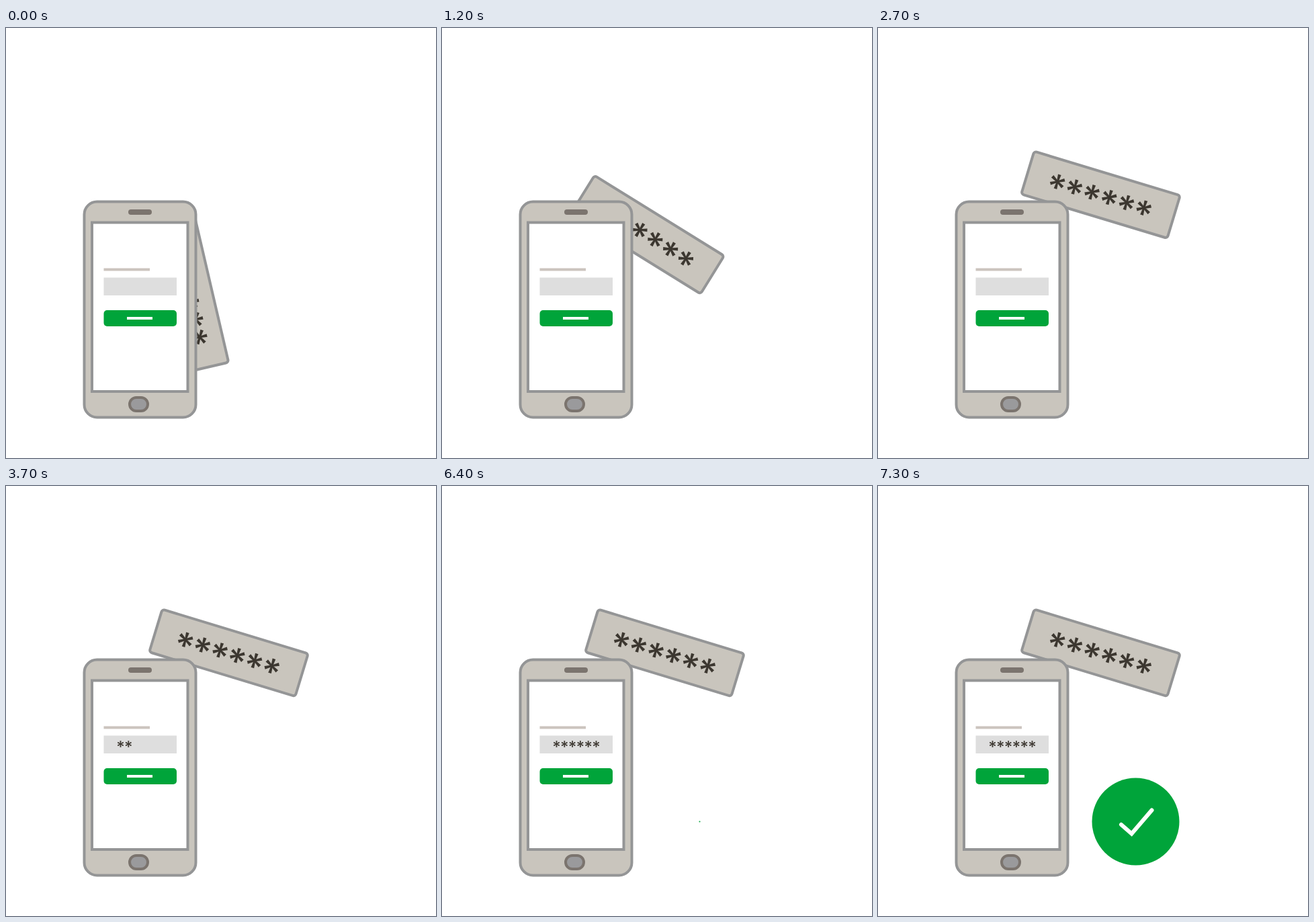
Animation of 640x640 px, one loop 9.2 s. Source, as an HTML page:

```html
<!DOCTYPE html>
<html lang="en">
<head>
<meta charset="utf-8">
<title>Entering a code</title>
<style>
html, body { margin: 0; width: 100%; height: 100%; overflow: hidden; background: #fff; }
svg { display: block; width: 100vw; height: 100vh; }
.body { fill: #c9c5bd; stroke: #949596; stroke-width: 4; }
.star { fill: #3c3730; }
.green { fill: #00a43a; }
</style>
</head>
<body>
<svg viewBox="0 0 640 640">
  <defs>
    <path id="arm" d="M-1.3 0L-2.4 -11H2.4L1.3 0Z"/>
    <g id="star"></g>
  </defs>
  <g id="card">
    <rect class="body" x="-113.5" y="-33.25" width="227" height="66.5" rx="4"/>
    <g id="code" class="star"></g>
  </g>
  <rect class="body" x="116.5" y="258.5" width="166" height="321" rx="19"/>
  <rect x="182" y="270" width="35" height="8" rx="4" fill="#7b746e"/>
  <rect x="128" y="289.5" width="142.5" height="251.5" fill="#fff" stroke="#949596" stroke-width="4"/>
  <rect x="184" y="550" width="27" height="20" rx="10" fill="#9a9a9c" stroke="#7b746e" stroke-width="4"/>
  <rect x="145.5" y="357.5" width="68.5" height="4" fill="#cbc4be"/>
  <rect x="145.5" y="371.5" width="108.5" height="26.5" fill="#dedede"/>
  <rect class="green" x="145.5" y="420" width="108.5" height="24" rx="5"/>
  <rect x="180" y="430" width="38" height="4" fill="#fff"/>
  <g id="typed" class="star"></g>
  <g id="done">
    <circle class="green" r="65"/>
    <path d="M-21.5 4.5L-6 18L24 -17" fill="none" stroke="#fff" stroke-width="6" stroke-linecap="round"/>
  </g>
</svg>
<script>
const LOOP = 9200, STEP = 100;
const $ = id => document.getElementById(id);

// Card pose: time, x, y, angle
const poses = [
  [500, 273.2, 394.6, 76.9],
  [1200, 305.9, 307.6, 31.8],
  [1500, 321, 268.5, 18.5],
  [1800, 329.5, 246, 14],
  [2300, 331, 247.7, 16.2],
  [2900, 331.5, 248.3, 16.9]
];
// First and last step of each typed character's fade
const keys = [[3100, 3200], [3500, 3700], [4400, 4500], [4800, 4900], [5100, 5200], [5600, 5700]];

const clamp = x => Math.min(1, Math.max(0, x));
const smooth = x => (x = clamp(x), x * x * (3 - 2 * x));
const use = (id, transform) => `<use href="#${id}" transform="${transform}"/>`;
const six = make => Array.from({ length: 6 }, (_, i) => make(i)).join('');

$('star').innerHTML = six(i => use('arm', `rotate(${i * 60})`));
$('code').innerHTML = six(i => use('star', `translate(${(i - 2.5) * 26.87} 0)`));
$('typed').innerHTML = six(i => use('star', `translate(${170.5 + i * 11.8} 384) scale(.44)`));
const typed = [...$('typed').children];

// Smooth curve through the poses, at rest at both ends
function slope(i, k) {
  const a = poses[i - 1], b = poses[i + 1];
  return a && b ? (b[k] - a[k]) / (b[0] - a[0]) : 0;
}

function pose(t, k) {
  t = Math.min(2900, Math.max(500, t));
  let i = 0;
  while (i < poses.length - 2 && t > poses[i + 1][0]) i++;
  const a = poses[i], b = poses[i + 1], d = b[0] - a[0], u = (t - a[0]) / d;
  return a[k] + (b[k] - a[k]) * smooth(u)
    + d * u * (1 - u) * (slope(i, k) * (1 - u) - slope(i + 1, k) * u);
}

function draw(now) {
  const t = Math.floor(now % LOOP / STEP) * STEP;
  $('card').setAttribute('transform',
    `translate(${pose(t, 1)} ${pose(t, 2)}) rotate(${pose(t, 3)})`);
  typed.forEach((el, i) => {
    const [a, b] = keys[i];
    el.setAttribute('opacity', clamp((t - a + STEP) / (b - a + STEP)));
  });
  const size = 1.3 * smooth((t - 6365) / 535) - 0.3 * smooth((t - 6900) / 400);
  $('done').setAttribute('transform', `translate(383.5 499.5) scale(${size})`);
  requestAnimationFrame(tick);
}

const start = performance.now();
function tick() { draw(performance.now() - start); }
tick();
</script>
</body>
</html>
```
